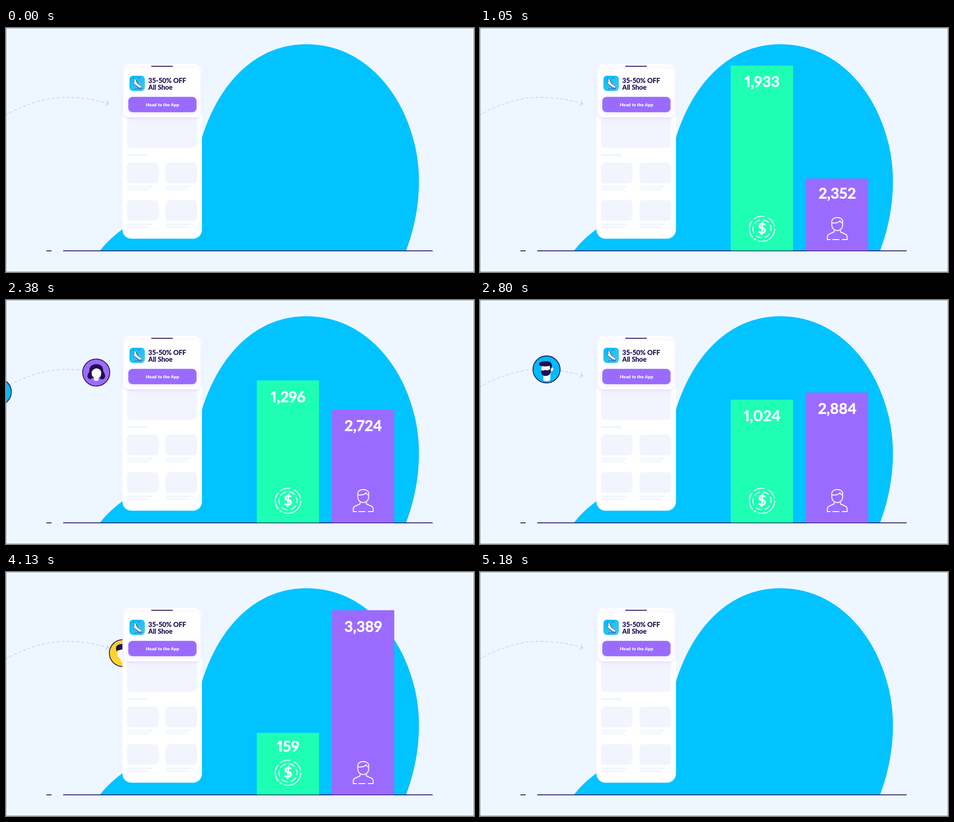
Write an HTML page that moves like this. It is 1033x542 px and loops after 5.25 s.

```html
<!DOCTYPE html>
<html lang="en">
<head>
<meta charset="utf-8">
<title>App growth</title>
<style>
  html, body { margin: 0; width: 100%; height: 100%; overflow: hidden; background: #eef7ff; }
  svg { display: block; width: 100%; height: 100%; }
  text { font-family: Lato, "Open Sans", sans-serif; font-weight: 700; }
  .title { font-size: 14.7px; fill: #1d1050; stroke: #1d1050; stroke-width: .3; }
  .cta { font-size: 10px; font-weight: 900; fill: #fff; text-anchor: middle; }
  .num { font-size: 33px; fill: #fff; stroke: #fff; stroke-width: .7; text-anchor: middle; font-variant-numeric: proportional-nums; }
  .line { fill: none; stroke: #fff; stroke-width: 2; stroke-linecap: round; stroke-linejoin: round; }
  .dash { fill: none; stroke: #d9d0f7; stroke-width: 2; stroke-linecap: round; stroke-linejoin: round; }
  .ink { fill: #20104b; }
  .skin { fill: #fff; }
</style>
</head>
<body>
<svg id="stage" viewBox="0 0 1033 542">
  <defs>
    <linearGradient id="sky" x1="0" y1="0" x2="1" y2="1">
      <stop offset="0" stop-color="#00bdf8"/><stop offset="1" stop-color="#4cc4f0"/>
    </linearGradient>
    <filter id="soft" x="-20%" y="-20%" width="140%" height="150%">
      <feDropShadow dx="0" dy="2" stdDeviation="4" flood-color="#9b6bff" flood-opacity=".22"/>
    </filter>
  </defs>

  <rect width="1033" height="542" fill="#eef7ff"/>
  <path fill="#00c3ff" d="M207 495C222 476 239 460 257 447C310 408 350 400 380 360C405 326 418 288 432 245C474 110 560 36 663 36C815 36 911.500 190 911.500 340C911.500 395 901 447 883 495Z"/>
  <path d="M90 495H100M127 495H941" stroke="#2b2066" stroke-width="2" stroke-linecap="round"/>

  <g class="dash">
    <path stroke-dasharray="5 6" d="M-20 205.400Q57.500 154 135 154Q180 154 226 168.200"/>
    <path d="M223 161.500L227 169L219 172.500"/>
  </g>
  <g id="riders"></g>

  <rect x="257" y="80" width="175.500" height="388" rx="20" fill="#fff"/>
  <g id="blanks" fill="#f2f5fd"></g>
  <rect x="260" y="89" width="169" height="109.500" rx="14" fill="#fff" filter="url(#soft)"/>
  <path d="M321.500 85H367.500" stroke="#2b1a5e" stroke-width="2" stroke-linecap="round"/>
  <g transform="translate(272.500 106)">
    <rect width="34" height="34" rx="8" fill="url(#sky)"/>
    <path d="M9 5L14 9L18 18L25 22Q28 24 27 27L22 27L12 20L8 15L11 13Z" fill="#fff" stroke="#2b2a70" stroke-width=".8"/>
    <path d="M9 17L20 27.500H27M14 12L17 11M15 15L19 14M10 29.500H27M18 5H24" fill="none" stroke="#2b2a70" stroke-width=".7"/>
  </g>
  <text class="title" x="314" y="122">35-50% OFF</text>
  <text class="title" x="314" y="137">All Shoe</text>
  <rect x="270" y="153" width="150.500" height="34" rx="9" fill="#9b6bff" filter="url(#soft)"/>
  <text class="cta" x="345.500" y="174">Head to the App</text>

  <g id="bars"></g>

  <rect x=".5" y=".5" width="1032" height="541" fill="none" stroke="#8e949a"/>
</svg>

<script>
const LOOP = 5250, STEP = 70, FLOOR = 494.5;
const $ = id => document.getElementById(id);
const clamp = v => Math.min(1, Math.max(0, v));
const part = (t, a, b) => clamp((t - a) / (b - a));
const mix = (a, b, k) => a + (b - a) * k;
const swing = k => (1 - Math.cos(Math.PI * k)) / 2;

function add(parent, tag, attrs = {}, inner = '') {
  const el = document.createElementNS('http://www.w3.org/2000/svg', tag);
  for (const name in attrs) el.setAttribute(name, attrs[name]);
  el.innerHTML = inner;
  return parent.appendChild(el);
}

// Placeholder page on the phone
const blank = (x, y, width, height, rx) => add($('blanks'), 'rect', { x, y, width, height, rx });
blank(267, 180, 154.500, 86, 8);
blank(267, 280, 45.500, 5, 2);
for (const x of [267, 352]) for (const y of [299, 382.500]) {
  blank(x, y, 69.500, 46, 8);
  blank(x, y + 51.500, 56, 4, 2);
  blank(x, y + 57.500, 49, 4, 2);
}

// Faces travelling along the dashed path; "at" is the time they pass x = -17
const curls = Array.from({ length: 11 }, (_, i) => {
  const a = Math.PI * (0.86 + i * 0.128);
  return `<circle class="ink" cx="${(15 * Math.cos(a)).toFixed(1)}" cy="${(-3 + 14 * Math.sin(a)).toFixed(1)}" r="6.500"/>`;
}).join('');

const riders = [
  { at: 1328, fill: '#ff1cf0', art: `
    <path class="ink" d="M-16 18C-15 6-17-17 0-19C17-18 15 6 18 17Q12 20 7 18H-8Z"/>
    <path class="skin" d="M-11-2Q2-2 7-9Q8-3 11-1Q12 10 5 12V17Q0 21-5 17V12Q-12 9-11-2Z"/>` },
  { at: 1830, fill: '#9b6bff', art: `
    <path class="ink" d="M-15-6C-15-22 14-23 15-7C15 0 22 4 19 11C17 17 9 16 7 12H-9C-13 18-21 13-19 6C-18 2-15 0-15-6Z"/>
    <path class="skin" d="M-10-2Q-5-10 2-9Q9-8 11-1C11 7 9 12 5 12V17Q0 21-5 17V11Q-11 9-10-2Z"/>` },
  { at: 2383, fill: '#00baff', art: `
    <path class="skin" d="M-11-9H9V-3Q14-6 15-1Q15 4 9 4L8 24Q0 28-7 24V10L-11 3Z"/>
    <path class="ink" d="M-16-9C-19-15-11-18-5-18C5-19 12-16 12-8L10-1L8-1L7-8Q-5-5-16-9Z"/>
    <path class="ink" d="M-12 2Q-6 4-4 1Q4 4 9-2Q11 10 4 13Q-5 17-10 11Q-13 7-12 2Z"/>` },
  { at: 2939, fill: '#1fffb4', art: `${curls}
    <circle class="ink" cx="0" cy="-5" r="16"/>
    <path class="skin" d="M-9-2Q-2-3 2-9Q8-8 8-3Q14-4 14 1Q13 6 9 6V18Q4 23-1 18V13Q-10 15-9-2Z"/>
    <path d="M10 3Q10 14-4 14M9 12V19" fill="none" stroke="#20104b" stroke-width="1.500"/>
    <circle class="ink" cx="-5" cy="14" r="2"/>` },
  { at: 3430, fill: '#ffd32e', art: `
    <path class="ink" d="M-15-8C-17-18-8-21 2-20C13-20 18-12 16-2L14 12H8L-10-2Q-14-3-15-8Z"/>
    <path class="skin" d="M-12-6Q-3-7 1-10Q5-6 10-5V-1Q14-2 14 2Q13 6 9 6L7 11V19Q1 23-5 18V12Q-13 12-12-6Z"/>` }
];
for (const r of riders) {
  r.el = add($('riders'), 'g', {},
    `<circle r="30" fill="${r.fill}" stroke="#20104b" stroke-width="1.800"/>${r.art}`);
}

const pathY = x => 154 + (x < 135 ? 0.00214 : 0.00173) * (x - 135) ** 2;

// Bars: start and end of height, value and label position
const coin = `
  <circle r="28" stroke-dasharray="52 6 5 5 38 8 22 9 24 7"/>
  <circle r="20" stroke-dasharray="13 8" transform="rotate(-25)"/>
  <text y="11" style="font-size:32px;font-weight:900;stroke:none;fill:#fff;text-anchor:middle">$</text>`;
const person = `
  <path d="M-12-16C-12-28 12-28 12-16V-9C12-1 6 4 0 4C-6 4-12-1-12-9ZM-12-13Q3-12 6-18Q8-13 12-13"/>
  <path d="M-7 4V7L-18 12Q-22 14-22 19V24H-15M7 4V7L18 12Q22 14 22 19V24H11M-10 24H4"/>`;

const bars = [
  { x: 553.5, fill: '#1fffb4', size: [416, 130], value: [1933, 114], label: [119, 394], icon: coin, iconX: 622.5 },
  { x: 719.5, fill: '#9b6bff', size: [162, 416], value: [2352, 3416], label: [367, 115], icon: person, iconX: 788.5 }
];
for (const b of bars) {
  b.rect = add($('bars'), 'rect', { x: b.x, width: 137.5, fill: b.fill });
  b.mark = add($('bars'), 'g', { class: 'line' }, b.icon);
  b.text = add($('bars'), 'text', { class: 'num', y: 12 });
}

// Spring up, hold, then drop with a small lift first
function growth(t) {
  if (t < 770) return 1.125 * Math.sin(Math.PI / 2 * part(t, 385, 770));
  if (t < 1050) return mix(1.125, 0.988, swing(part(t, 770, 1050)));
  if (t < 4340) return mix(0.988, 1, swing(part(t, 1050, 1260)));
  return 1 + 0.01 * Math.sin(Math.PI * part(t, 4340, 4640)) - part(t, 4600, 4960) ** 4;
}

function pop(t) {
  const k = part(t, 560, 840) - 1;
  return (1 + 2.7 * k ** 3 + 1.7 * k ** 2) * (1 - part(t, 4620, 4860) ** 2);
}

function draw(t) {
  const k = part(t, 1400, 4200), grow = growth(t), scale = pop(t);
  for (const b of bars) {
    const h = Math.max(0, mix(...b.size, k) * grow);
    b.rect.setAttribute('y', FLOOR - h);
    b.rect.setAttribute('height', h);
    b.text.textContent = Math.round(mix(...b.value, k)).toLocaleString('en-US');
    b.text.setAttribute('transform', `translate(${b.iconX} ${mix(...b.label, k)}) scale(${scale})`);
    b.mark.setAttribute('transform', `translate(${b.iconX} 446) scale(${scale})`);
  }
  for (const r of riders) {
    const x = -17 + 0.393 * (t - r.at);
    r.el.setAttribute('transform', `translate(${x} ${pathY(x)})`);
    r.el.style.display = x > -40 && x < 300 ? '' : 'none';
  }
}

function tick() {
  const t = performance.now() % LOOP;
  draw(Math.floor(t / STEP) * STEP);
  requestAnimationFrame(tick);
}
tick();
</script>
</body>
</html>
```
